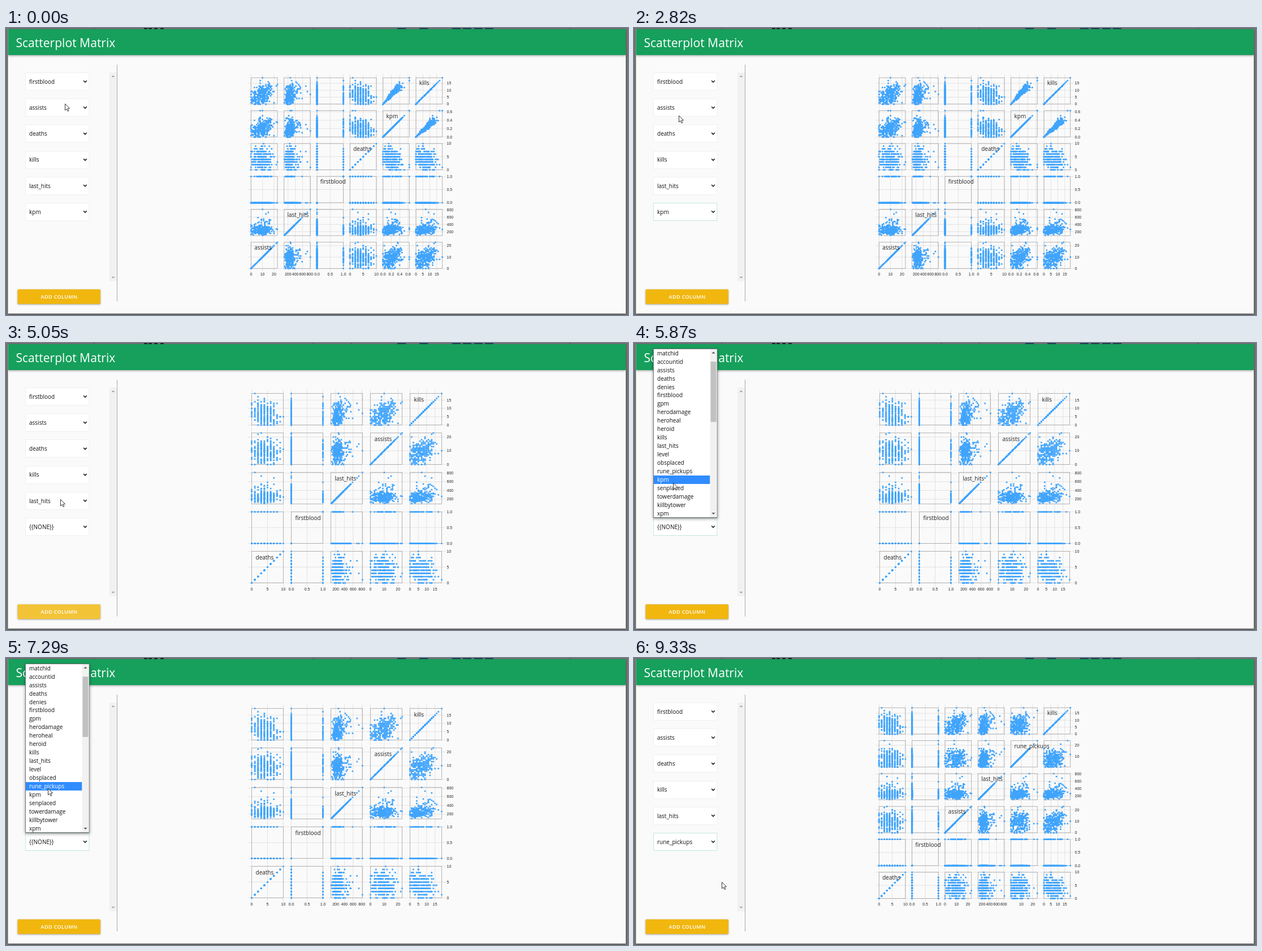
These frames come from a looping animation (1100 by 509 pixels, 9.55 s). An HTML page with a canvas:

```html
<!DOCTYPE html>
<html lang="en">
<head>
<meta charset="utf-8">
<title>Scatterplot Matrix</title>
<style>
html, body { margin: 0; width: 100%; height: 100%; overflow: hidden; background: #757575; }
canvas { display: block; }
</style>
</head>
<body>
<canvas id="stage" width="1100" height="509"></canvas>
<script>
const W = 1100, H = 509, LOOP = 9550;
const ctx = document.getElementById('stage').getContext('2d');
const SANS = '"Open Sans", "Noto Sans", sans-serif';
const ARIAL = '"Liberation Sans", Arial, sans-serif';

const OPTIONS = ('{{NONE}} {{DELETE}} matchid accountid assists deaths denies firstblood gpm ' +
  'herodamage heroheal heroid kills last_hits level obsplaced rune_pickups kpm senplaced ' +
  'towerdamage killbytower xpm').split(' ');

const axis = (min, max, start, step, digits = 0) => ({ min, max, start, step, digits });
const AXES = {
  kills: axis(0, 19, 0, 5),
  assists: axis(0, 23, 0, 10),
  deaths: axis(0, 10, 0, 5),
  firstblood: axis(0, 1, 0, .5, 1),
  last_hits: axis(89, 817, 200, 200),
  kpm: axis(0, .63, 0, .2, 1),
  rune_pickups: axis(1, 24, 10, 10)
};

// pointer path: step, x, y
const PATH = [
  [0, 104, 134], [1, 105, 180], [3, 104, 364], [6, 78, 341], [7, 73, 111], [8, 70, 27],
  [9, 70, 27], [10, 67, 26], [11, 65, 25], [12, 65, 25], [13, 66, 40], [15, 92, 270],
  [17, 104, 344], [18, 104, 350], [21, 96, 468], [23, 95, 466], [24, 97, 340],
  [25, 96, 277], [27, 82, 328], [28, 70, 250], [30, 68, 245], [31, 67, 233],
  [34, 71, 258], [36, 74, 231], [38, 76, 229], [40, 76, 232], [42, 70, 346],
  [45, 150, 394], [46, 155, 397]
];

const DATA = makeData();
const MATRICES = [
  ['assists', 'last_hits', 'firstblood', 'deaths', 'kpm', 'kills'],
  ['deaths', 'firstblood', 'last_hits', 'assists', 'kills'],
  ['deaths', 'firstblood', 'assists', 'last_hits', 'rune_pickups', 'kills']
].map(makeMatrix);

function makeData() {
  let seed = 4127;
  const rnd = () => {
    seed = (seed * 1664525 + 1013904223) % 4294967296;
    return seed / 4294967296;
  };
  const gauss = () => (rnd() + rnd() + rnd() + rnd() - 2) * 1.73;
  const clamp = (v, a, b) => Math.min(b, Math.max(a, v));
  const whole = (v, a, b) => {
    const r = Math.round(v);
    return r < a ? a + Math.floor(rnd() * 4) : clamp(r, a, b);
  };
  const row = (kills, assists, deaths, last_hits, rune_pickups, mins, firstblood = 0) => ({
    kills, assists, deaths, last_hits, rune_pickups, firstblood,
    kpm: clamp(kills / mins, 0, .63)
  });
  // the extremes of each axis, then a correlated cloud
  const rows = [
    row(19, 10, 1, 262, 12, 30), row(14, 23, 3, 264, 9, 40), row(7, 10, 1, 817, 17, 48),
    row(9, 15, 3, 732, 14, 47), row(5, 11, 10, 250, 8, 37), row(17, 8, 2, 300, 24, 27, 1)
  ];
  while (rows.length < 270) {
    const g = gauss(), length = gauss();
    const deaths = whole(4 + 2.3 * gauss() - .5 * g, 0, 9);
    const kills = whole(6.3 + 3.7 * g - .35 * (deaths - 4) + .8 * length, 0, 18);
    const assists = whole(9 + 4.3 * gauss() + 1.1 * g + 1.3 * length, 0, 22);
    const hits = clamp(Math.exp(5.47 + .3 * gauss() + .15 * length + .09 * g), 92, 690);
    const runes = whole(7.5 + 4 * gauss() + 1.2 * length + .6 * g, 1, 22);
    rows.push(row(kills, assists, deaths, hits, runes, 32 + 5 * length, rnd() < .13 ? 1 : 0));
  }
  return rows;
}

function line(c, x1, y1, x2, y2, color, width = 1) {
  c.strokeStyle = color;
  c.lineWidth = width;
  c.beginPath();
  c.moveTo(x1, y1);
  c.lineTo(x2, y2);
  c.stroke();
}

function text(c, s, x, y, font, color, align = 'left') {
  c.font = font;
  c.fillStyle = color;
  c.textAlign = align;
  c.fillText(s, x, y);
}

function box(c, x, y, w, h, color) {
  c.fillStyle = color;
  c.fillRect(x, y, w, h);
}

function poly(c, points) {
  c.beginPath();
  points.forEach(([x, y]) => c.lineTo(x, y));
}

function shadow(c, color, blur, dy) {
  c.shadowColor = color;
  c.shadowBlur = blur;
  c.shadowOffsetY = dy;
}

function makeMatrix(keys) {
  const canvas = document.createElement('canvas');
  canvas.width = W;
  canvas.height = H;
  const c = canvas.getContext('2d');
  const left = 427.5, top = 82.4, total = 350;
  const n = keys.length, pitch = total / n, pad = pitch * .2, size = pitch - pad;
  const cellX = i => left + i * pitch + pad / 2;
  const cellY = i => top + (n - 1 - i) * pitch + pad / 2;
  const part = (key, v) => (v - AXES[key].min) / (AXES[key].max - AXES[key].min) * size;
  const labels = [];

  keys.forEach((key, i) => {
    const { max, start, step, digits } = AXES[key];
    for (let k = 0; start + k * step <= max + 1e-6; k++) {
      const v = start + k * step, d = part(key, v);
      const x = cellX(i) + d, y = cellY(i) + size - d;
      line(c, x, top, x, top + total, '#dddddd', .8);
      line(c, left, y, left + total, y, '#dddddd', .8);
      labels.push([v.toFixed(digits), x, y]);
    }
  });
  for (const [s, x, y] of labels) {
    text(c, s, x, top + total + 6.2, '7px ' + ARIAL, '#222', 'center');
    text(c, s, left + total + 2, y + 2.4, '7px ' + ARIAL, '#222');
  }

  keys.forEach((kx, i) => keys.forEach((ky, j) => {
    const x = cellX(i), y = cellY(j);
    c.strokeStyle = '#aaaaaa';
    c.lineWidth = .9;
    c.strokeRect(x, y, size, size);
    c.fillStyle = '#40a4fc';
    for (const row of DATA) {
      c.beginPath();
      c.arc(x + part(kx, row[kx]), y + size - part(ky, row[ky]), 1.5, 0, 7);
      c.fill();
    }
    if (i === j) text(c, kx, x + pad / 2, y + pad / 2 + 7.1, '10px ' + SANS, '#222');
  }));
  return canvas;
}

function drawFrame() {
  box(ctx, 0, 0, W, H, '#757575');
  [155, 543, 610, 997].forEach(x => box(ctx, x, 0, 1, 2, '#4a4a4a'));
  [244, 252, 262, 273].forEach(x => box(ctx, x, 0, 6, 2, '#222'));
  [692, 731, 789, 808, 828, 847].forEach(x => box(ctx, x, 0, 15, 2, '#1f4257'));

  ctx.save();
  shadow(ctx, 'rgba(0,0,0,.35)', 4, 1);
  box(ctx, 3.5, 2, 1092.5, 504.5, '#fafafa');
  ctx.beginPath();
  ctx.rect(3.5, 2, 1092.5, 504.5);
  ctx.clip();
  shadow(ctx, 'rgba(0,0,0,.4)', 4, 1);
  box(ctx, 3.5, 2, 1092.5, 46, '#16a05c');
  ctx.restore();
  text(ctx, 'Scatterplot Matrix', 17.5, 34, '21.1px ' + SANS, '#fff');

  box(ctx, 183, 79, 13, 370, '#f1f1f1');
  arrow(189.5, 85.5, -1, '#a3a3a3');
  arrow(189.5, 442.5, 1, '#a3a3a3');
  line(ctx, 196.5, 65, 196.5, 485, '#aaaaaa');
}

function arrow(x, y, dir, color) {
  ctx.fillStyle = color;
  poly(ctx, [[x - 3, y - 1.5 * dir], [x + 3, y - 1.5 * dir], [x, y + 1.5 * dir]]);
  ctx.fill();
}

function drawSelect(label, i, focused) {
  const y = 95 + i * 46.2;
  box(ctx, 34.5, y - 15.5, 112, 31, '#fff');
  ctx.strokeStyle = focused ? '#c3e8df' : '#f0f0f0';
  ctx.lineWidth = 1;
  ctx.strokeRect(34.5, Math.round(y - 16) + .5, 112.5, 31);
  text(ctx, label, 41, y + 3.8, '10px ' + SANS, '#111');
  ctx.strokeStyle = '#111';
  ctx.lineWidth = 1.5;
  poly(ctx, [[137.2, y - 1.7], [140, y + 1.2], [142.8, y - 1.7]]);
  ctx.stroke();
}

function drawButton(hover) {
  ctx.save();
  shadow(ctx, 'rgba(0,0,0,.35)', 3, 1);
  ctx.fillStyle = hover ? '#f3c337' : '#f1b70f';
  ctx.beginPath();
  ctx.roundRect(20.5, 463.5, 146.5, 26, 1.5);
  ctx.fill();
  ctx.restore();
  ctx.letterSpacing = '0.4px';
  text(ctx, 'ADD COLUMN', 94, 479.8, '600 9px ' + SANS, '#fff', 'center');
  ctx.letterSpacing = '0px';
}

function drawList(active, scroll) {
  ctx.save();
  shadow(ctx, 'rgba(0,0,0,.4)', 5, 2);
  box(ctx, 34, 10, 113.5, 300, '#777');
  ctx.restore();
  box(ctx, 35, 11, 111.5, 298, '#fff');
  OPTIONS.slice(scroll, scroll + 20).forEach((name, i) => {
    const y = 18 + i * 14.95, on = i + scroll === active;
    if (on) box(ctx, 35, Math.round(y - 7.5), 99.5, 15, '#308cff');
    text(ctx, name, 41, y + 3.7, '10px ' + SANS, on ? '#fff' : '#111');
  });
  box(ctx, 134.5, 11, 12, 298, '#f1f1f1');
  box(ctx, 135.5, 23 + scroll * 5, 10, 107, '#c1c1c1');
  arrow(140.5, 17, -1, scroll ? '#505050' : '#a3a3a3');
  arrow(140.5, 302.5, 1, '#505050');
}

function drawPointer([x, y]) {
  poly(ctx, [[0, 0], [0, 11.5], [2.7, 9], [4.6, 13.2], [6.4, 12.4], [4.6, 8.3], [8, 8.1]]
    .map(([a, b]) => [x + .5 + a, y + .5 + b]));
  ctx.closePath();
  ctx.fillStyle = '#fff';
  ctx.fill();
  ctx.strokeStyle = '#222';
  ctx.lineWidth = .9;
  ctx.stroke();
}

function pointerAt(step) {
  const i = Math.max(1, PATH.findIndex(p => p[0] >= step));
  const [s0, x0, y0] = PATH[i - 1], [s1, x1, y1] = PATH[i];
  const f = Math.max(0, (step - s0) / (s1 - s0));
  return [x0 + (x1 - x0) * f, y0 + (y1 - y0) * f];
}

// The highlight trails the pointer slightly; off the list it marks the chosen option.
function activeOption(step, scroll) {
  const y = pointerAt(step - .025)[1];
  if (y > 310) return step < 20 ? 17 : 0;
  return Math.floor((y - 10.5) / 14.95) + scroll;
}

function draw(t) {
  // The screen refreshes about five times a second.
  const step = Math.min(46, Math.floor(t / 200), Math.floor((t + 36) / 203.4));
  const during = (a, b) => step >= a && step < b;
  const columns = ['firstblood', 'assists', 'deaths', 'kills', 'last_hits'];
  if (step < 15) columns.push('kpm');
  else if (step >= 22) columns.push(step < 43 ? '{{NONE}}' : 'rune_pickups');
  const focus = during(4, 15) || step >= 27;
  const scroll = step >= 28 ? 2 : 0;

  drawFrame();
  columns.forEach((name, i) => drawSelect(name, i, focus && i === 5));
  drawButton(during(21, 26));
  ctx.drawImage(MATRICES[step < 15 ? 0 : step < 43 ? 1 : 2], 0, 0);
  if (during(5, 14) || during(27, 41)) drawList(activeOption(step, scroll), scroll);
  drawPointer(pointerAt(step));
}

const begin = performance.now();
function tick() {
  draw((performance.now() - begin) % LOOP);
  requestAnimationFrame(tick);
}
tick();
</script>
</body>
</html>
```
